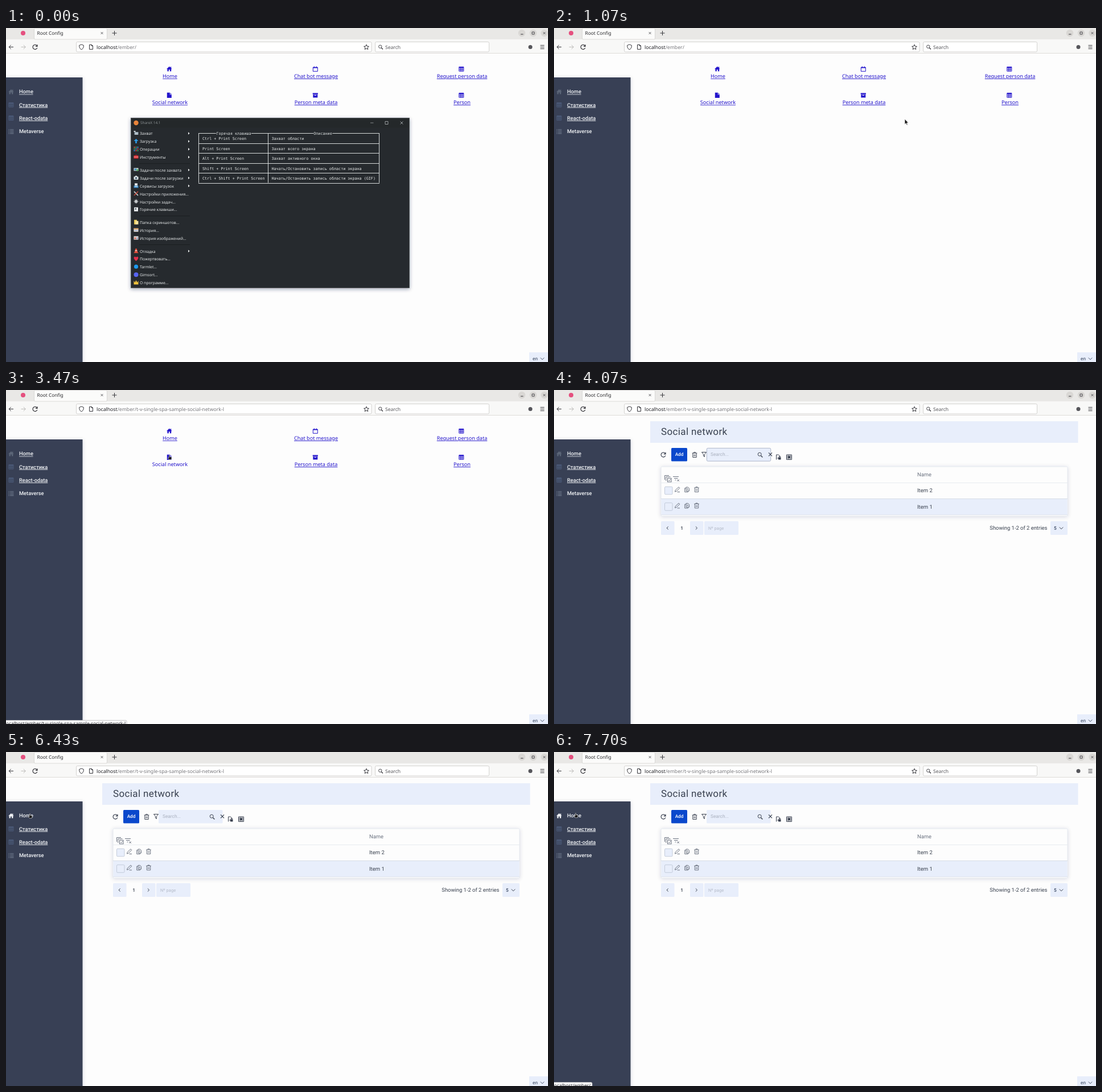
An HTML page for the animation above (8 s loop, 952 px wide and 588 px high).

```html
<!DOCTYPE html>
<html lang="en">
<head>
<meta charset="utf-8">
<title>Root Config</title>
<style>
html, body { margin: 0; width: 100%; height: 100%; overflow: hidden; background: #fdfdfd; }
svg { display: block; width: 952px; height: 588px; }
text { text-rendering: geometricPrecision; white-space: pre; }
.ui { font-family: "Noto Sans", "Open Sans", sans-serif; }
.app { font-family: Roboto, Inter, sans-serif; }
.mono { font-family: "DejaVu Sans Mono", "Liberation Mono", monospace; }
.u { text-decoration: underline; text-decoration-thickness: .8px; }
.mid { text-anchor: middle; }
.ln { fill: none; stroke: currentColor; }

#window, #links, #social, #focus, #homeLine, #netLine, #sideLine, #sideIcon,
#shortStatus, #longStatus, #arrow, #hand { animation: 8s step-end infinite; }
#window { animation-name: window; }
#links { animation-name: links; }
#social { animation-name: social; }
#focus { animation-name: focus; }
#homeLine { animation-name: home; }
#netLine { animation-name: net; }
#sideLine { animation-name: side; }
#sideIcon { animation-name: glow; }
#shortStatus { animation-name: short; }
#longStatus { animation-name: long; }
#arrow { animation-name: arrow; }
#hand { animation-name: hand; }
#cursor { animation: path 8s ease-in-out infinite; }

@keyframes window { 0% { opacity: 1 } 11.7%, 100% { opacity: 0 } }
@keyframes links { 0% { opacity: 1 } 46.25%, 100% { opacity: 0 } }
@keyframes social { 0% { opacity: 0 } 46.25%, 100% { opacity: 1 } }
@keyframes focus { 0% { opacity: 0 } 49% { opacity: 1 } 55%, 100% { opacity: 0 } }
@keyframes home { 0% { opacity: 1 } 20.625% { opacity: 0 } 30.25%, 100% { opacity: 1 } }
@keyframes net { 0% { opacity: 1 } 33.75%, 100% { opacity: 0 } }
@keyframes side { 0% { opacity: 1 } 78.125% { opacity: 0 } 84.375% { opacity: 1 } 93.125%, 100% { opacity: 0 } }
@keyframes glow { 0% { color: #5b6577 } 78.125% { color: #eef0f4 } 84.375% { color: #5b6577 } 93.125%, 100% { color: #eef0f4 } }
@keyframes short {
  0% { opacity: 0 } 22.875% { opacity: 1 } 34.375% { opacity: 0 }
  81.25% { opacity: 1 } 86.875% { opacity: 0 } 95%, 100% { opacity: 1 }
}
@keyframes long { 0% { opacity: 0 } 34.375% { opacity: 1 } 45%, 100% { opacity: 0 } }
@keyframes arrow {
  0% { opacity: 0 } 3% { opacity: 1 } 20.625% { opacity: 0 } 30.25% { opacity: 1 } 33.75% { opacity: 0 }
  46.25% { opacity: 1 } 48.75% { opacity: 0 } 55% { opacity: 1 } 78.125% { opacity: 0 }
  84.375% { opacity: 1 } 93.125%, 100% { opacity: 0 }
}
@keyframes hand {
  0% { opacity: 0 } 20.625% { opacity: 1 } 30.25% { opacity: 0 } 33.75% { opacity: 1 } 46.25% { opacity: 0 }
  78.125% { opacity: 1 } 84.375% { opacity: 0 } 93.125%, 100% { opacity: 1 }
}
@keyframes path {
  0% { transform: translate(700px, 290px) }
  8.375% { transform: translate(638px, 174px) }
  10%, 11.7% { transform: translate(642px, 167px) }
  20.625% { transform: translate(284px, 73px) }
  21.625%, 22.875% { transform: translate(283px, 80px) }
  25% { transform: translate(280px, 81px) }
  27.875%, 29.6% { transform: translate(283px, 82px) }
  32.5% { transform: translate(291px, 102px) }
  34.4% { transform: translate(284px, 118px) }
  39.6% { transform: translate(286px, 116px) }
  41.25%, 44% { transform: translate(287px, 115px) }
  50%, 53.75% { transform: translate(300px, 114px) }
  56.25% { transform: translate(258px, 127px) }
  59.6% { transform: translate(216px, 128px) }
  62.1%, 73.4% { transform: translate(215px, 127px) }
  78.1% { transform: translate(58px, 110px) }
  80.4% { transform: translate(42px, 109px) }
  83.4%, 84% { transform: translate(41px, 110px) }
  87.5% { transform: translate(120px, 86px) }
  90% { transform: translate(132px, 78px) }
  93.75% { transform: translate(45px, 110px) }
  96.25%, 100% { transform: translate(38px, 108px) }
}
</style>
</head>
<body>
<svg id="stage" viewBox="0 0 952 588" xmlns="http://www.w3.org/2000/svg"></svg>
<script>
const rect = (x, y, w, h, fill, more = '') =>
  `<rect x="${x}" y="${y}" width="${w}" height="${h}" fill="${fill}" ${more}/>`;
const dot = (x, y, r, fill) => `<circle cx="${x}" cy="${y}" r="${r}" fill="${fill}"/>`;
const line = (d, color, w = 1, more = '') =>
  `<path d="${d}" fill="none" stroke="${color}" stroke-width="${w}" ${more}/>`;
const text = (x, y, size, fill, str, cls = 'ui', more = '') =>
  `<text x="${x}" y="${y}" font-size="${size}" fill="${fill}" class="${cls}" ${more}>${str}</text>`;
const group = (id, body) => `<g id="${id}">${body}</g>`;

// Icons are drawn around their own centre in the current colour.
const glyph = {
  home: '<path fill="currentColor" d="M0-4.5 4.8 0H3.4V4H1V1H-1V4H-3.4V0H-4.8ZM2-4H3.4V-1H2Z"/>',
  table: '<path class="ln" d="M-4-3.8H4V3.8H-4ZM-4-1.5H4M-4 1.2H4M-1.3-3.8V3.8M1.3-3.8V3.8"/><path class="ln" stroke-width="1.6" d="M-4-3.4H4"/>',
  list: '<path class="ln" stroke-width="1.2" d="M-4.5-3H-3M-2-3H4.5M-4.5-.5H-3M-2-.5H4.5M-4.5 2H-3M-2 2H4.5M-4.5 4H-3M-2 4H4.5"/>',
  calendar: '<path class="ln" d="M-4-3H4V4H-4ZM-2-4.8V-2M2-4.8V-2"/><path class="ln" stroke-width="1.6" d="M-4-2.6H4"/>',
  file: '<path fill="currentColor" d="M-4-4.8H1V-1.2H4V4.6H-4ZM1.8-4.6 4-2H1.8Z"/>',
  box: '<path fill="currentColor" d="M-4.6-4H4.6V-1.8H-4.6ZM-4-1.2H4V4H-4Z"/><path stroke="#fff" d="M-1.5 0H1.5"/>',
  trash: '<path class="ln" d="M-4.3-3.2H4.3M-1.5-3.4V-4.6H1.5V-3.4M-3.2-3V4.2H3.2V-3M-1-.8V2.2M1-.8V2.2"/>',
  pencil: '<path class="ln" d="M-4 3.8-3.3 1 2.5-4.5 4.3-2.8-1.5 3ZM0 4.2H4.5"/>',
  copy: '<path class="ln" d="M-1.5-4.2H2L4-2V2.5H-1.5ZM-1.5-2.5H-3.8V4.3H2V2.5M0 0H2.5M0-1.7H2"/>',
  reload: '<path class="ln" stroke-width="1.2" d="M3.6-1.8A4 4 0 1 0 3.8 1.4M4-4.3V-1.2H.9"/>',
  funnel: '<path class="ln" d="M-4-3.8H4L1 0V4.2L-1 3V0Z"/>',
  lens: '<circle class="ln" cx="-.8" cy="-.8" r="3"/><path class="ln" stroke-width="1.4" d="M1.4 1.4 4.4 4.4"/>',
  cross: '<path class="ln" stroke-width="1.2" d="M-3-3 3 3M3-3-3 3"/>',
  left: '<path class="ln" d="M1.2-2.6-1.5 0 1.2 2.6"/>',
  right: '<path class="ln" d="M-1.2-2.6 1.5 0-1.2 2.6"/>',
  down: '<path class="ln" d="M-3.2-1.5 0 1.8 3.2-1.5"/>',
  back: '<path class="ln" d="M4 0H-3.8M-.2-3.6-3.8 0-.2 3.6"/>',
  forth: '<path class="ln" d="M-4 0H3.8M.2-3.6 3.8 0 .2 3.6"/>',
  star: '<path class="ln" d="M0-4.3 1.3-1.4 4.4-1.1 2 1 2.8 4.2 0 2.5-2.8 4.2-2 1-4.4-1.1-1.3-1.4Z"/>',
  shield: '<path class="ln" d="M0-4.5 3.8-3C4 1 2.6 3.3 0 4.5-2.6 3.3-4 1-3.8-3Z"/>',
  page: '<path class="ln" d="M-3-4H1L3-2V4H-3ZM1-4V-2H3"/>'
};
const icon = (name, x, y, color, scale = 1, more = '') =>
  `<g ${more} style="color:${color}" transform="translate(${x} ${y}) scale(${scale})">${glyph[name]}</g>`;

const INK = '#3a4150', PALE = '#e8eefb', BLUE = '#2415cc', DARK = '#272c2e';

function browser() {
  const ink = '#35353a';
  let s = rect(0, 0, 952, 20, '#e9e8e6') + rect(0, 20, 952, 24, '#f8f8f7')
    + rect(0, 44, 952, 1, '#dedcd9')
    + rect(49.5, .5, 128, 19.5, '#fbfbfa', 'rx="2" stroke="#cfcdca" stroke-width=".7"')
    + dot(30, 9, 4, '#e5507f')
    + text(54.5, 12, 8.35, '#2c2c2f', 'Root Config')
    + icon('cross', 168.5, 9, ink, .65) + line('M186.5 9H194.5M190.5 5V13', ink)
    + icon('back', 9, 33.5, ink) + icon('forth', 30.5, 33.5, '#bdbcba') + icon('reload', 51, 33.5, ink)
    + rect(123.5, 24.5, 518.5, 17.5, '#fff', 'rx="2" stroke="#c9c8c6" stroke-width=".8"')
    + rect(648.5, 24.5, 200, 17.5, '#fff', 'rx="2" stroke="#c9c8c6" stroke-width=".8"')
    + icon('shield', 132.5, 33.5, ink) + icon('page', 149.5, 33.5, ink) + icon('star', 633, 33.5, ink)
    + icon('lens', 658, 33.5, ink, .9) + text(666, 36.5, 8.55, '#56565a', 'Search')
    + dot(921, 33.5, 3.5, '#55555a')
    + line('M938.5 30.5H945.5M938.5 33.5H945.5M938.5 36.5H945.5', ink);
  for (const x of [906, 926, 945.5]) s += dot(x, 9, 6.2, '#d9d7d4');
  s += line('M904 11H908.5', ink) + line('M924 7H928V11H924Z', ink, .9) + icon('cross', 945.5, 9, ink, .65);
  const url = path => `<tspan fill="#1f1f23">localhost</tspan>${path}`;
  const tail = 't-v-single-spa-sample-social-network-l';
  s += text(159, 36.5, 8.68, '#77777b', url('/ember/'));
  s += `<g id="urlTail">${text(229, 36.5, 8.68, '#77777b', tail)}</g>`;
  return s;
}

function sidebar() {
  let s = rect(0, 87, 134.5, 510, '#374055', 'filter="url(#soft)"');
  const rows = [['home', 'Home'], ['table', 'Статистика'], ['table', 'React-odata'], ['list', 'Metaverse']];
  rows.forEach(([name, label], i) => {
    const y = 112 + i * 23.3;
    s += i ? icon(name, 9, y, name == 'list' ? '#667184' : '#4b5a78')
      : `<g id="sideIcon"><g transform="translate(9 112.5)">${glyph.home}</g></g>`;
    s += text(23, y + 3.3, 9.25, '#f2f4f7', label, i == 1 || i == 2 ? 'app u' : 'app', 'font-weight="500"');
  });
  return s + group('sideLine', rect(23, 116.6, 24.5, .8, '#f2f4f7'))
    + rect(919, 571, 33, 17, PALE) + text(925, 585, 8.3, '#33415c', 'en', 'app') + icon('down', 942, 582, '#4a566e');
}

function links() {
  const cells = [['home', 'Home'], ['calendar', 'Chat bot message'], ['table', 'Request person data'],
    ['file', 'Social network'], ['box', 'Person meta data'], ['table', 'Person']];
  let s = rect(135.5, 45.5, 817, 120, '#fdfdfd', 'opacity="0"');
  cells.forEach(([name, label], i) => {
    const x = 288 + i % 3 * 256.5, y = i < 3 ? 72.3 : 118.5;
    s += icon(name, x - 1.2, y, BLUE)
      + text(x, y + 15.7, 9.1, BLUE, label, i == 0 || i == 3 ? 'ui mid' : 'ui mid u');
  });
  return s + group('homeLine', rect(275.2, 89.2, 25.6, .8, BLUE))
    + group('netLine', rect(257, 135.4, 62, .8, BLUE));
}

function social() {
  const grey = '#6b7280';
  let s = rect(169, 55, 751.5, 38, PALE)
    + text(188, 78.5, 17, '#39414f', 'Social network', 'app', 'letter-spacing=".38"')
    + icon('reload', 192, 114, INK) + rect(206, 102, 28, 23.5, '#0a48cc', 'rx="1.5"')
    + text(220, 116.3, 8.2, '#fff', 'Add', 'app mid', 'font-weight="500"')
    + icon('trash', 247, 114.3, INK) + icon('funnel', 263.5, 113.3, INK)
    + rect(268, 102, 112.5, 23.5, PALE, 'rx="1.5"')
    + group('focus', rect(268.3, 102.4, 112.4, 22.8, 'none', 'rx="2" stroke="#a9b2c4" stroke-width=".9"'))
    + text(275, 116.3, 8.3, '#a9b0be', 'Search...', 'app')
    + icon('lens', 362, 114, INK) + icon('cross', 380, 113.3, INK)
    + line('M390.5 122.5V114H394.5L396.5 116V118M392 120H394', INK)
    + rect(394, 118.5, 4.5, 4, INK) + line('M395 118.5V117H397.5V118.5', INK, .8)
    + line('M408.5 114H417.5V122.5H408.5ZM408.5 116.8H417.5M408.5 119.6H417.5M411.5 114V122.5M414.5 114V122.5', INK)
    + rect(412, 117, 3, 3, INK);

  s += rect(188, 135, 714, 87, '#fdfdfd', 'rx="1.5" stroke="#d9dfe9" stroke-width=".7" filter="url(#soft)"')
    + rect(188.5, 192, 713, 27.5, PALE)
    + line('M188 163.5H902', '#e3e7ee', .8) + line('M188 191.5H902', '#cfd6e3', .8) + line('M188 219.7H902', '#d6dce7', .8)
    + text(638, 151.8, 9.4, grey, 'Name', 'app')
    + line('M194.5 158V150.5H202M196.8 160V152.8H204.5', grey)
    + rect(199.5, 155.3, 6.5, 6.5, '#fff', `stroke="${grey}"`) + line('M201 158.5 202.5 160 205 157', grey)
    + line('M209 152.5H219M211 155.5H217.5M212.5 158.3H214.5M216.5 157.5 219.8 160.8M219.8 157.5 216.5 160.8', grey);
  ['Item 2', 'Item 1'].forEach((label, i) => {
    const y = 175.3 + i * 28.4;
    s += rect(194.5, y - 5, 13.5, 13.5, PALE, 'rx="1.5" stroke="#b9c2d2" stroke-width=".8"')
      + icon('pencil', 216.5, y, grey) + icon('copy', 233.5, y, grey) + icon('trash', 250.5, y, grey)
      + text(638, y + 5, 9.5, '#39414f', label, 'app');
  });

  s += [[188, 23.5], [239, 23.5], [264, 60], [872, 30]].map(([x, w]) => rect(x, 231, w, 24, PALE, 'rx="1.5"')).join('')
    + icon('left', 199.5, 243, INK) + icon('right', 250, 243, INK)
    + text(224.7, 245.8, 8.2, '#2f3746', '1', 'app mid', 'font-weight="500"')
    + text(271, 245.5, 7.5, '#b3bac8', 'Nº page', 'app')
    + text(765.3, 246.2, 9.42, '#39414f', 'Showing 1-2 of 2 entries', 'app')
    + text(878, 245.8, 8.2, '#33415c', '5', 'app', 'font-weight="500"') + icon('down', 891, 243, INK);
  return s;
}

// Small coloured menu icons in an 8 by 8 box.
const menuArt = [
  rect(0, 0, 3, 2, '#c8d0d4') + rect(1, 2, 7, 5, '#8fa2ad') + line('M2 4H7M2 6H7', '#e8edf0', .8),
  '<path fill="#2f9be6" d="M4 0 8 4H5.3V8H2.7V4H0Z"/>',
  [0, 1, 2].map(c => [0, 1, 2].map(r => rect(c * 3, r * 3, 2, 2, ['#e04f4f', '#43b45c', '#3d8fe0'][(c + r) % 3])).join('')).join(''),
  rect(0, 1.5, 8, 5.5, '#d92b2f') + rect(0, 3.8, 8, .8, '#f3d4d4') + rect(3, .5, 2, 1, '#d92b2f'),
  rect(0, 1, 8, 5, '#d8dfe2') + rect(1, 2, 4, 3, '#3d86b8') + rect(5, 3, 3, 3, '#4caf50'),
  rect(0, 2, 8, 5.5, '#dce3e6', 'rx="1"') + rect(2.5, .7, 3, 2, '#dce3e6') + dot(4, 4.7, 1.7, '#3e596b'),
  rect(0, 4, 8, 4, '#3b8fcd') + rect(1.5, 0, 5, 4, '#e2e8eb') + rect(1.5, 5, 5, 1.2, '#dff0fa'),
  line('M.5 .5 7.5 7.5', '#c9cfd2', 1.6) + line('M7.5 .5 .5 7.5', '#d04a3a', 1.4),
  dot(4, 4, 2.4, '#e6eaec') + dot(4, 4, 1, DARK) + line('M4 0V8M0 4H2M6 4H8M1.2 1.2 2.4 2.4M5.6 5.6 6.8 6.8M6.8 1.2 5.6 2.4M2.4 5.6 1.2 6.8', '#e6eaec', .9),
  rect(.5, .5, 7, 7, '#e9edef') + rect(2, 2, 2.5, 2.5, '#59656b'),
  rect(.5, 0, 5, 8, '#e9c95a') + rect(3, 2, 5, 6, '#f4e3a0'),
  rect(0, 1, 8, 6, '#e8e4df') + rect(0, 1, 8, 1.7, '#e09a4c') + line('M1 4.5H7', '#7b8dbf'),
  rect(0, 1, 8, 6, '#e8e4df') + rect(1, 3, 3, 3, '#d2685a') + rect(5, 3, 2, 3, '#7b8dbf'),
  '<path fill="#e2503c" d="M3 0H5L7 7H8V8H0V7H1Z"/>' + line('M2.3 3.5H5.7', '#f6e9e6', 1.2),
  '<path fill="#e2304b" d="M4 8C-3 3 1-2 4 1.5 7-2 11 3 4 8Z"/>',
  dot(4, 4, 3.6, '#1d9bf0'),
  dot(4, 4, 4, '#5865f2'),
  '<path fill="#f0c33c" d="M0 1 2 4 4 0 6 4 8 1V7.5H0Z"/>'
];

function toolWindow() {
  let s = rect(219.5, 158.5, 489, 299, DARK, 'stroke="#4a4f51" stroke-width=".8" filter="url(#deep)"')
    + rect(220, 159, 488, 16.5, '#24282a')
    + dot(228.5, 167, 4.2, '#e8843a') + text(236, 169.4, 6.45, '#8b9193', 'ShareX 14.1')
    + line('M640 167H645.5', '#8f9597', .9) + line('M666 164.5H671V169.5H666Z', '#a3a8aa', .9)
    + icon('cross', 695, 167, '#a3a8aa', .8);

  const sections = [
    [185.5, 'Захват>', 'Загрузка>', 'Операции>', 'Инструменты>'],
    [250, 'Задачи после захвата>', 'Задачи после загрузки>', 'Сервисы загрузок>', 'Настройки приложения...', 'Настройки задач...', 'Горячие клавиши...'],
    [342.2, 'Папка скриншотов...', 'История...', 'История изображений...'],
    [392.8, 'Отладка>', 'Пожертвовать...', 'Tarmlet...', 'Gimsort...', 'О программе...']
  ];
  let n = 0;
  for (const [top, ...items] of sections) {
    if (n) s += line(`M234 ${top - 11.3}H323`, '#1b1f21', 1);
    items.forEach((item, i) => {
      const y = top + i * 13.95;
      s += `<g transform="translate(224.5 ${y - 4.5})">${menuArt[n++]}</g>`
        + text(235, y + 2.7, 6.85, '#e6e9ea', item.replace('>', ''));
      if (item.endsWith('>')) s += `<path d="M320 ${y - 2.3}l2.6 2.3-2.6 2.3Z" fill="#f0f2f2"/>`;
    });
  }

  const keys = [
    ['Ctrl + Print Screen', 'Захват области'],
    ['Print Screen', 'Захват всего экрана'],
    ['Alt + Print Screen', 'Захват активного окна'],
    ['Shift + Print Screen', 'Начать/Остановить запись области экрана'],
    ['Ctrl + Shift + Print Screen', 'Начать/Остановить запись области экрана (GIF)']
  ];
  s += line('M338.5 185.5V272.5M460.5 185.5V272.5M655.5 185.5V272.5M338 185.5H369M431 185.5H540M573.5 185.5H656', '#dfe3e3', .95)
    + text(400, 188.3, 6.75, '#dfe3e3', 'Горячая клавиша', 'mono mid')
    + text(556.5, 188.3, 6.75, '#dfe3e3', 'Описание', 'mono mid');
  keys.forEach(([key, what], i) => {
    const y = 197.3 + i * 17.4;
    s += text(345, y, 6.74, '#e8ebeb', key, 'mono') + text(466.5, y, 6.74, '#e8ebeb', what, 'mono')
      + line(`M338 ${Math.round(y + 5.6) + .5}H656`, '#dfe3e3', .95);
  });
  return s;
}

const status = (w, str) =>
  `<path d="M-1 581.5H${w - 2}Q${w} 581.5 ${w} 583.5V590H-1Z" fill="#f7f7f8" stroke="#bdbdbf" stroke-width=".8"/>`
  + text(-2, 590, 8.22, '#2f2f33', str);

const cursor = `<g stroke="#fff" stroke-width=".8" fill="#111">
  ${group('arrow', '<path d="M0 0V9.6L2.2 7.6 3.7 11 5.2 10.3 3.7 7H6.6Z"/>')}
  ${group('hand', '<path stroke-width=".5" d="M-.8 0Q0-1 .8 0V2.6L3.6 3.3Q4.2 3.6 4 4.8L3.3 7.6H-.8L-2.9 4.6Q-2.6 3.7-1.6 4.4L-.8 5Z"/>')}
</g>`;

const shadow = (id, dy, blur, alpha) =>
  `<filter id="${id}" x="-20%" y="-20%" width="140%" height="140%">
    <feDropShadow dx="0" dy="${dy}" stdDeviation="${blur}" flood-color="#1c2a4a" flood-opacity="${alpha}"/></filter>`;

document.getElementById('stage').innerHTML =
  `<defs>${shadow('soft', 1, 3.5, .16)}${shadow('deep', 2, 3, .4)}
   <style>#urlTail{animation:tail 8s step-end infinite}
   @keyframes tail{0%{opacity:0}43.3%,100%{opacity:1}}</style></defs>`
  + rect(0, 0, 952, 588, '#fdfdfd') + sidebar() + browser()
  + group('links', links()) + group('social', social()) + group('window', toolWindow())
  + group('shortStatus', status(67, 'localhost/ember/'))
  + group('longStatus', status(212, 'localhost/ember/t-v-single-spa-sample-social-network-l'))
  + group('cursor', cursor);
</script>
</body>
</html>
```
